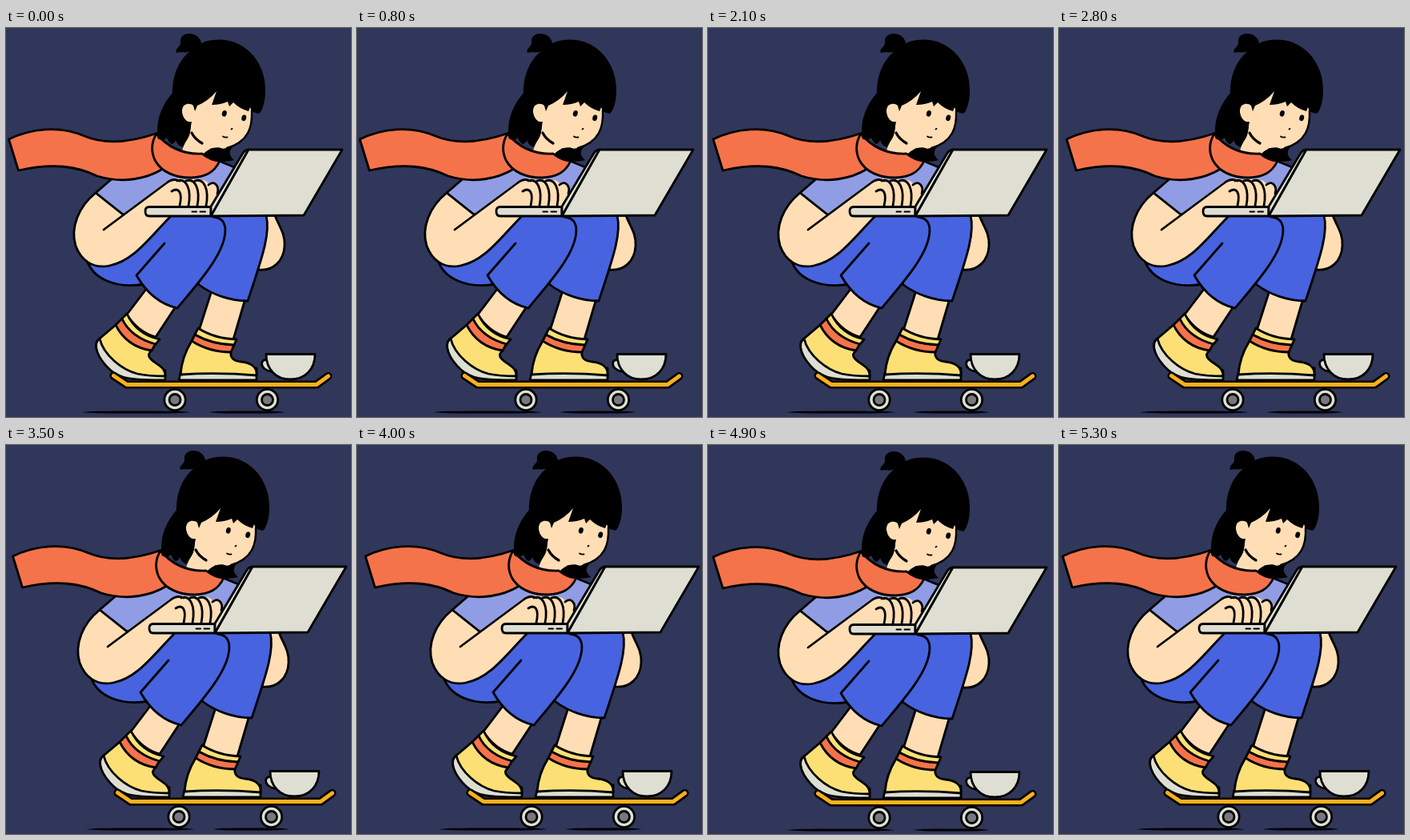
An HTML page that plays this animation: 431 by 486 pixels, repeating every 5500 ms.

```html
<!DOCTYPE html>
<html lang="en">
<head>
<meta charset="utf-8">
<title>Skateboard laptop</title>
<style>
  html, body { margin: 0; width: 100%; height: 100%; overflow: hidden; background: #30375a; }
  svg { display: block; width: 100%; height: 100%; }
  #rider { stroke: #000; stroke-width: 2.8; stroke-linejoin: round; stroke-linecap: round; fill: none; }
  .skin { fill: #ffdeb5; }
  .blue { fill: #4763df; }
  .lilac { fill: #909de4; }
  .orange { fill: #f5734a; }
  .yellow { fill: #fce076; }
  .grey { fill: #dedfd2; }
  .hub { fill: #777780; }
  .ink { fill: #000; }
  .bare { stroke: none; }
</style>
</head>
<body>
<svg viewBox="0 0 431 486">
  <defs>
    <g id="wheel">
      <circle class="grey" r="13.2"/>
      <circle class="hub" r="7"/>
    </g>
    <path id="finger" d="M0 191C11 187 18 201 14 222"/>
    <path id="deck" d="M134.500 434.500L151 445.500H388L402.500 435"/>
    <ellipse id="eye" rx="2.900" ry="3.900" transform="rotate(15)"/>
  </defs>
  <g id="rider">
    <!-- ground shadows -->
    <g class="ink bare">
      <ellipse cx="163" cy="480" rx="67" ry="1.600"/>
      <ellipse cx="301" cy="480" rx="47" ry="1.600"/>
    </g>

    <!-- far arm -->
    <path class="skin" d="M322 234H336C340 246 349 256 348 272C347 291 334 304 315 302Z"/>

    <!-- legs -->
    <path class="skin" d="M257 328L241 378Q261 390 284 389L299 338Z"/>
    <path class="blue" d="M262 234H325C331 258 318 292 302 341C280 341 257 333 240 320Z"/>
    <path class="skin" d="M176 325L151 358Q165 380 187 386L212 348Z"/>
    <path class="blue" d="M101 290C109 314 138 326 173 320L240 232H196L130 280Z"/>
    <path class="blue bare" d="M163 309L198 269L205 232H262C272 237 276 247 273 261C268 288 238 321 214 350C192 345 175 330 163 309Z"/>
    <path d="M198 269L163 309C175 330 192 345 214 350C238 321 268 288 273 261C276 247 272 237 259 236"/>

    <!-- near boot -->
    <path class="grey" d="M117 388C107 395 115 413 130 427C142 438 155 440 199 440V428L140 400Z"/>
    <path class="yellow" d="M137 371L117 388C122 409 145 427 164 432C178 435 190 435 199 435C199 421 184 420 179 411Q177 407 182 403Z"/>
    <path class="orange" d="M145 363L137 371C146 389 162 400 182 403L187 394C168 390 152 379 145 363Z"/>
    <path class="yellow" d="M151 357L145 363C152 379 168 390 187 395L192 389C173 385 159 374 151 357Z"/>

    <!-- far boot -->
    <path class="grey" d="M218 431L216 440H313V425H225Z"/>
    <path class="yellow" d="M232 391C224 404 219 419 218 433Q265 430 313 434C314 423 305 418 294 417C284 416 280 412 281 405Z"/>
    <path class="orange" d="M236 383L232 391Q254 405 281 405L285 396Q257 395 236 383Z"/>
    <path class="yellow" d="M240 375L236 383Q257 395 285 396L288 389Q260 388 240 375Z"/>

    <!-- cup -->
    <path class="grey" d="M327 415C317 412 316 427 331 429"/>
    <path class="grey" d="M325 407.500H386C386 426 374 439 355 439C337 439 325 426 325 407.500Z"/>

    <!-- board -->
    <use href="#deck" stroke-width="10.200"/>
    <use href="#deck" stroke="#fbb01d" stroke-width="5"/>
    <use href="#wheel" x="211" y="464.500"/>
    <use href="#wheel" x="326.500" y="464.500"/>

    <!-- shirt -->
    <path class="lilac" d="M112 206L134 187L200 170L266 166L290 176L262 225L146 233Z"/>

    <!-- bun, head and back of the neck -->
    <path class="ink bare" d="M230 29C225 32 218 29 213 31C210 26 219 23 218 18C217 11 222 7 229 7C237 7 243 12 244 19C251 15.500 259 14.500 267 14.500C302 15 325 46 324 79C324 92 320 104 316 107L305 104L280 150L215 140L208 84C207 61 215 41 230 29Z"/>

    <!-- face and neck -->
    <path class="skin bare" d="M232 117C225 119 219 110 220 102C221 94 230 93 234 97L236 104L239 97Q253 91 263 79L257 96Q268 96 277 92L279 98L284 93Q292 101 303 104L305 99L307 104C308 124 303 142 276 150Q266 152 256 150L248 160L220 154Q221 147 227 138C231 132 230 125 232 117Z"/>
    <path d="M307 103C308 124 303 142 276 150" stroke-width="2.400"/>
    <path d="M232 131Q236 139 245 144" stroke-width="3.200"/>
    <g class="ink bare">
      <use href="#eye" x="272.800" y="106.800"/>
      <use href="#eye" x="297.200" y="112.300"/>
    </g>
    <path d="M281.500 126.500L282.500 125.800M271 135.500Q273 137 276.500 136.500" stroke-width="1.800"/>

    <!-- scarf -->
    <path class="orange" d="M3.500 139C30 126 66 121 98 135C124 146 156 143 190 131L196 176C176 188 147 195 114 185C89 173 60 168 15.500 178Z"/>
    <path class="orange" d="M188 132C182 142 181 154 186 165C194 180 211 187 231 187C249 186 260 181 267 166C258 166 250 161 245 157C222 158 202 149 188 132Z"/>

    <!-- loose hair over the scarf -->
    <path class="ink bare" d="M209 80C194 97 189 113 189 129Q188 138 191 139Q198 141 201 137Q203 143 207 145Q211 144 212 140Q214 147 221 149Q223 144 227 138Q231 130 231 118C225 119 219 110 220 102L222 90Z"/>
    <path class="ink bare" d="M246 158C253 150 264 147 271 151Q281 149 288 145C277 152 278 159 285 165C275 168 257 168 246 158Z"/>

    <!-- near arm and hand -->
    <path class="skin bare" d="M112 206C91 223 80 249 87 272C94 291 109 301 129 297C160 291 180 261 205 236L264 224L266 203C264 194 258 191 253 195C250 189 243 189 239 191C235 188 229 189 226 191C219 187 207 187 200 192L146 233Z"/>
    <path d="M146 233L112 206C91 223 80 249 87 272C94 291 109 301 129 297C160 291 180 261 205 236M122 252L200 194C206 189 211 188 217 191M207 204C215 199 221 204 217 222M253 196C260 190 267 197 264 207"/>
    <use href="#finger" x="214"/>
    <use href="#finger" x="225"/>
    <use href="#finger" x="236"/>

    <!-- laptop -->
    <path class="grey" d="M179 223.500H256V235H179Q174 235 174 229Q174 223.500 179 223.500Z"/>
    <path d="M232.500 229.500H238M242.500 229.500H249" stroke-width="2"/>
    <path class="grey" d="M303 152Q298 152 295 158L256 223V235Z"/>
    <path class="grey" d="M303 152H420L372 234L256 235Z"/>
  </g>
</svg>
<script>
  const LOOP = 5500, TICK = 100;
  // key poses of the drift: tick, x, y
  const poses = [
    [0, 0, 0], [2, 0, 0], [3, -1, -1], [6, -1, -1], [9, 1, 1], [13, 2, -2],
    [17, 1, 0], [20, 1, 0], [21, 3, 0], [24, 5, 2], [28, 6, 0], [30, 7, 2],
    [35, 5, 0], [37, 4, -2], [40, 7, 0], [45, 5, -2], [48, 3, 1], [53, 1, 0],
    [55, 0, 0]
  ];
  const rider = document.getElementById('rider');

  // whole-pixel position on the straight line between two poses
  function offset(tick) {
    const i = poses.findIndex(p => p[0] > tick);
    const a = poses[i - 1], b = poses[i];
    const k = (tick - a[0]) / (b[0] - a[0]);
    return [1, 2].map(n => Math.round(a[n] + (b[n] - a[n]) * k));
  }

  const start = performance.now();
  function draw() {
    const t = (performance.now() - start) % LOOP;
    rider.setAttribute('transform', `translate(${offset(Math.floor(t / TICK))})`);
    requestAnimationFrame(draw);
  }
  draw();
</script>
</body>
</html>
```
